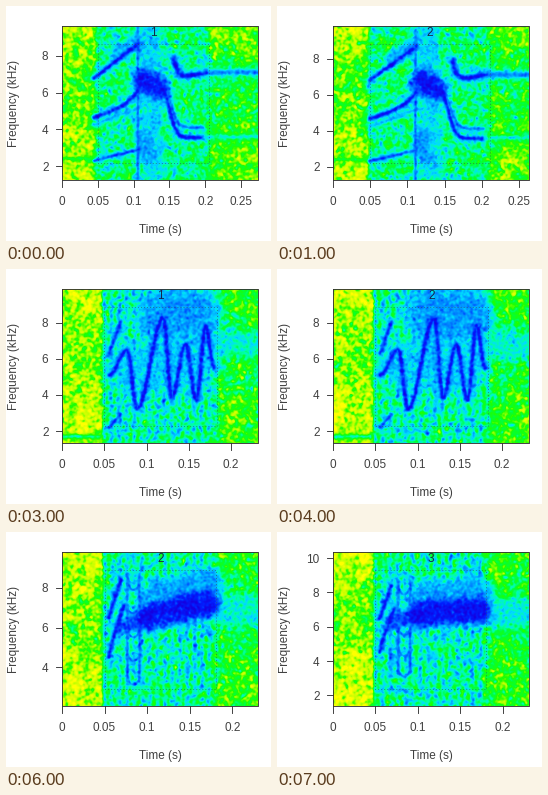
These frames come from a looping animation (265 px wide and 235 px high, 8000 ms). A matplotlib script:

```python
import numpy as np
import matplotlib.pyplot as plt
from matplotlib.animation import FuncAnimation
from matplotlib.colors import LinearSegmentedColormap

W, H, DPI = 265, 235, 100
L, R, T, B = 56, 252, 20, 174          # plot box in pixels
PX = 72 / DPI                          # one pixel in points
INK, TEXT = "#333333", "#404040"

CMAP = LinearSegmentedColormap.from_list("level", [
    (0, "#ffff00"), (.15, "#c3ff00"), (.29, "#1eff00"), (.40, "#00ff3c"),
    (.50, "#00ffaa"), (.59, "#00dcff"), (.74, "#0080ff"), (.88, "#0020ff"),
    (1, "#1400e1")])

X, Y = np.meshgrid(np.arange(L, R) + .5, np.arange(T, B) + .5)


# Marks: contours in seconds and kHz, with loudness, width and edge power

def ridge(t, khz, level=.94, width=2.4, power=2):
    t, khz = np.broadcast_arrays(t, khz)
    return t, khz, level, width, power


def cloud(t, khz, level=.7, width=10):
    return ridge(t, khz, level, width, power=4)


def chirp(onset):
    """Rising harmonics, a noisy jump, then two falling bands."""
    p = np.linspace(0, 1, 14)
    jump = onset + .061
    rise = onset + .061 * p
    fall = jump + .034 + .055 * p
    drop = 1 / (1 + np.exp((fall - jump - .045) / .0045))
    tail = jump + .050 + .045 * p
    hook = 6.75 + 1.1 * np.exp(-9 * p) + .35 * p
    return dict(
        levels=(.21, .46, .31), end=jump + .10, stripe=0,
        marks=[
            cloud(jump + .016 + .006 * p, 9.6 - 7.8 * p, .61, 12),
            cloud(onset + .03 + .03 * p, 8 + .8 * p, .68, 8),
            cloud(jump + .006 + .008 * p, 3.6 - p, .70, 9),
            cloud(jump + .008 + .02 * p, 6.7 - .4 * p, .94, 13),
            ridge(rise, 6.8 + 1.85 * p),
            ridge(rise, 4.65 + .85 * p + .6 * p ** 4),
            ridge(rise, 4.25 + .9 * p, .66),
            ridge(rise, 2.3 + .6 * p, .84, 2),
            ridge(jump, 9.6 - 8.3 * p, .78, 1.8),
            ridge(fall, 3.55 + 2.9 * drop),
            ridge(fall + .002, 4.1 + 2.2 * drop, .78, 2),
            ridge(tail, hook, .96, 3),
            ridge(tail[-1] + .1 * p, 7.1, .76, 3.2),
            ridge(fall[-1] + .1 * p, 3.6, .56, 2.4),
            ridge(.06 * p - .012, 2.4, .38, 1.8)])


def trill():
    """A tone swinging up and down with a noisy top half."""
    p = np.linspace(0, 1, 50)
    turns = [.056, .077, .089, .120, .130, .146, .159, .170, .180]
    tones = [5.1, 6.5, 3.2, 8.3, 3.8, 6.8, 3.7, 7.8, 5.5]
    step = p * (len(turns) - 1)
    i = np.minimum(step.astype(int), len(turns) - 2)
    ease = (1 - np.cos(np.pi * (step - i))) / 2
    swing = np.take(tones, i) * (1 - ease) + np.take(tones, i + 1) * ease
    q = p[::10]
    return dict(
        levels=(.17, .51, .35), end=.183, stripe=.06,
        marks=[
            cloud(.12 + .045 * q, 8.4, .72, 30),
            cloud(.09 + .08 * q, 5.6, .62, 24),
            cloud(.19 + .06 * q, 6.8, .55, 14),
            ridge(np.interp(step, range(len(turns)), turns), swing),
            ridge(.056 + .016 * q, 6.3 + 2.1 * q, .88),
            ridge(.056 + .016 * q, 2.2 + .9 * q, .86, 2),
            ridge(.054 * q, 1.7, .53, 1.8)])


def dense(start, climb):
    """Two quick upstrokes, a ladder and a loud drifting band."""
    p = np.linspace(0, 1, 8)
    rungs = [ridge(.077 + .014 * p, khz - 1.2 * p * (1 - p), .78, 1.6)
             for khz in np.arange(3.4, 8.5, 1.2)]
    rails = [ridge(t, 3.3 + 5.4 * p, .78, 1.8) for t in (.077, .091)]
    return dict(
        levels=(.18, .51, .36), end=.181, stripe=.06,
        marks=[
            cloud(.11 + .06 * p, start + 1 + climb * p, .70, 18),
            cloud(.19 + .06 * p, 6.8, .56, 16),
            cloud(.068 + .03 * p, start - .5 + .5 * p, .84, 8),
            cloud(.103 + .068 * p, start + climb * p, .97, 14),
            ridge(.055 + .014 * p, 6.5 + 1.9 * p, .92),
            ridge(.055 + .018 * p, 4.5 + 2.6 * p ** .8, .92),
            *rails, *rungs])


# call, label, pixel row of 8 kHz, pixels per 2 kHz, pixels per second
SCENES = [
    (chirp(.045), "1", 50, 36.7, 716),
    (chirp(.050), "2", 52.5, 36, 744),
    (chirp(.050), "3", 52, 36, 716),
    (trill(), "1", 53.5, 36.2, 845),
    (trill(), "2", 53.5, 36.2, 845),
    (dense(6.4, 1.05), "1", 56, 39.5, 851),
    (dense(6.5, .7), "2", 56, 39.5, 851),
    (dense(6.7, .2), "3", 60.4, 34.3, 848)]


def noise(rng, size):
    """Smooth random texture of unit spread."""
    n = rng.standard_normal(X.shape)
    fy = np.fft.fftfreq(n.shape[0])[:, None]
    fx = np.fft.fftfreq(n.shape[1])
    gain = np.exp(-2 * (np.pi * size) ** 2 * (fx ** 2 + fy ** 2))
    n = np.fft.ifft2(np.fft.fft2(n) * gain).real
    return n / n.std()


def distance(xs, ys):
    """Distance of every pixel to a polyline."""
    best = np.full(X.shape, 1e9)
    for x, y, dx, dy in zip(xs, ys, np.diff(xs), np.diff(ys)):
        t = ((X - x) * dx + (Y - y) * dy) / (dx * dx + dy * dy + 1e-9)
        t = np.clip(t, 0, 1)
        best = np.minimum(best, np.hypot(X - x - t * dx, Y - y - t * dy))
    return best


def edge(x, soft):
    return 1 / (1 + np.exp(-(X - x) / soft))


def raise_to(v, level, mask):
    return v + np.maximum(level - v, 0) * mask


def spectrogram(seed, call, y8, step, scale):
    rng = np.random.default_rng(seed)
    before, during, after = call["levels"]
    start, stop = L + .05 * scale, L + call["end"] * scale
    opened, closed = edge(start - 2, .8), edge(stop, 2.5)
    inside = opened * (1 - closed)
    v = before + (during - before) * opened + (after - during) * closed
    v += (1 - inside) * .06 * np.cos((Y - 85) / 24)
    v += inside * call["stripe"] * np.cos(2 * np.pi * (X - start) / 7.5)
    v += .065 * noise(rng, 1.3) + .025 * noise(rng, 4)

    for t, khz, level, width, power in call["marks"]:
        d = distance(L + t * scale, y8 + (8 - khz) / 2 * step)
        if power == 2:
            v = raise_to(v, .68 * level, .6 * np.exp(-(d / (2.8 * width)) ** 2))
        v = raise_to(v, level, .9 * np.exp(-(d / width) ** power))
    return np.clip(v + .04 * noise(rng, 1), 0, 1)


fig = plt.figure(figsize=(W / DPI, H / DPI), dpi=DPI, facecolor="white")
ax = fig.add_axes([0, 0, 1, 1])
images = [spectrogram(seed, call, *axis)
          for seed, (call, _, *axis) in enumerate(SCENES)]


def text(x, y, s, **kw):
    style = dict(family="Liberation Sans", size=11.8 * PX, color=TEXT,
                 ha="center", va="center")
    ax.text(x, y, s, **{**style, **kw})


def line(xs, ys, **kw):
    ax.plot(xs, ys, **{**dict(color=INK, lw=.9 * PX), **kw})


def frame(x0, y0, x1, y1, **kw):
    line([x0, x1, x1, x0, x0], [y0, y0, y1, y1, y0], **kw)


def draw(i):
    call, label, y8, step, scale = SCENES[i]
    ax.clear()
    ax.set(xlim=(0, W), ylim=(H, 0))
    ax.axis("off")
    ax.imshow(images[i], cmap=CMAP, vmin=0, vmax=1, extent=(L, R, B, T),
              interpolation="nearest", aspect="auto")

    x0, x1 = L + .05 * scale, L + call["end"] * scale
    frame(x0, 38, x1, 157, lw=.8 * PX, color="#2f4f4f", alpha=.7,
          ls=(0, (1.2, 2.6)))
    text((x0 + x1) / 2, 27, label, color="#15254a")
    frame(L, T, R, B)

    for sec in np.arange(6) * .05:
        x = L + sec * scale
        if x < R:
            line([x, x], [B, B + 6.5])
            text(x, 196, f"{sec:.2g}")
    for khz in range(2, 11, 2):
        y = y8 + (8 - khz) / 2 * step
        if T < y < B - 1:
            line([L - 6.5, L], [y, y])
            text(42.5, y, str(khz), ha="right", va="center_baseline")
    text(154, 224, "Time (s)")
    text(8.5, 97, "Frequency (kHz)", rotation=90)
    return ax.get_children()


anim = FuncAnimation(fig, draw, frames=len(SCENES), interval=1000,
                     init_func=lambda: draw(0), repeat=True, repeat_delay=0)
plt.show()
```
